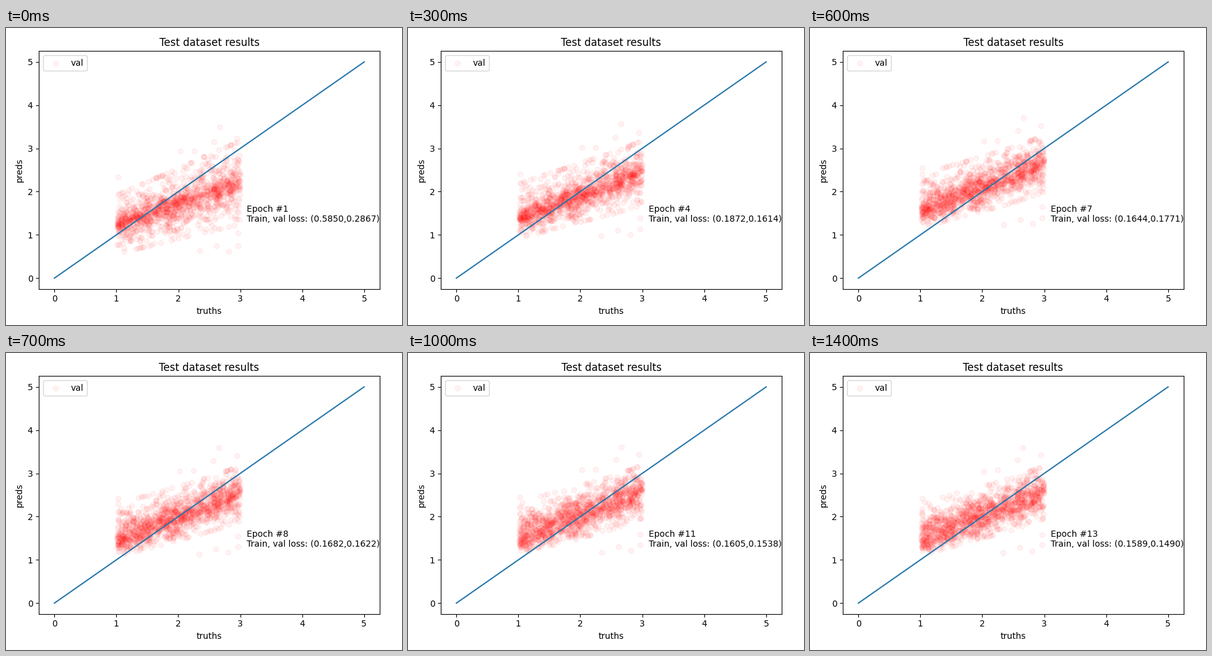
A matplotlib script that plays this animation: 640x480 px, repeating every 1.5 s.

```python
import numpy as np
import matplotlib.pyplot as plt
from matplotlib.animation import FuncAnimation

FRAMES, INTERVAL = 15, 100
COUNT = 1350
BEST_EPOCH = 13

# Losses at a few epochs, the rest lie between them
LOSS_EPOCHS = [1, 4, 7, 9, 11, 13]
TRAIN_LOSS = [0.5850, 0.1872, 0.1644, 0.1720, 0.1605, 0.1589]
VAL_LOSS = [0.2867, 0.1614, 0.1771, 0.1472, 0.1538, 0.1490]

# Far-off points: truth and distance from the cloud's middle
STRAYS = np.array([
    (2.57, 0.96), (2.03, 1.0), (2.25, 0.9), (2.66, 1.2), (1.03, 0.9), (2.94, 0.88),
    (2.34, -1.05), (2.61, -1.07), (2.81, -1.25), (2.96, -1.2), (2.96, -0.96),
])

rng = np.random.default_rng(5)
truths = rng.uniform(1.01, 3.0, COUNT)
early_noise = rng.laplace(0, 0.7, COUNT)
late_noise = rng.standard_normal(COUNT)
all_truths = np.concatenate([truths, STRAYS[:, 0]])


def progress(epoch):
    return 1 - np.exp(-(epoch - 1) / 3)


def blend(start, end, t):
    return start + (end - start) * t


def middle(x, epoch):
    t = progress(epoch)
    sway = 0.12 * np.cos(np.pi * (epoch - 7) / 2) * np.exp(-abs(epoch - 7) / 2)
    return blend(blend(1.25, 1.52, t), blend(2.22, 2.58, t), (x - 1) / 2) + sway


def predictions(epoch):
    t = progress(epoch)
    turn = 0.1 * (epoch - 1)
    z = np.clip(np.cos(turn) * early_noise + np.sin(turn) * late_noise, -2.4, 2.4)
    # Training piles up the small values near their lower edge
    skew = 0.35 * t * np.interp(truths, [1, 2.5], [1, 0])
    z = z + skew * (z**2 - 1) / 2
    spread = blend(blend(0.28, 0.25, t), blend(0.40, 0.25, t), (truths - 1) / 2)
    cloud = middle(truths, epoch) + spread * z

    x, offset = STRAYS.T
    strays = middle(x, epoch) + offset * blend(1.2, 1, t)
    return np.concatenate([cloud, strays])


fig, ax = plt.subplots(figsize=(6.4, 4.8), dpi=100)
dots = ax.scatter(all_truths, predictions(1), color="red", alpha=0.05, label="val")
ax.plot([0, 5], [0, 5], color="#2676aa")
ax.set(xlim=(-0.25, 5.25), ylim=(-0.25, 5.25), xlabel="truths", ylabel="preds",
       title="Test dataset results")
ax.legend(loc="upper left")
note = ax.text(3.1, 1.3, "")


def update(frame):
    # The run ends by going back to the best epoch
    epoch = frame + 1 if frame < FRAMES - 1 else BEST_EPOCH
    train, val = (np.interp(epoch, LOSS_EPOCHS, loss) for loss in (TRAIN_LOSS, VAL_LOSS))
    note.set_text(f"Epoch #{epoch}\nTrain, val loss: ({train:.4f},{val:.4f})")
    dots.set_offsets(np.column_stack([all_truths, predictions(epoch)]))
    # The note's width sets the margins, so lay out afresh each time
    fig.subplots_adjust(left=0.125, right=0.9, bottom=0.11, top=0.88)
    fig.tight_layout()
    return dots, note


anim = FuncAnimation(fig, update, frames=FRAMES, interval=INTERVAL,
                     repeat=True, repeat_delay=0, blit=False)
plt.show()
```
